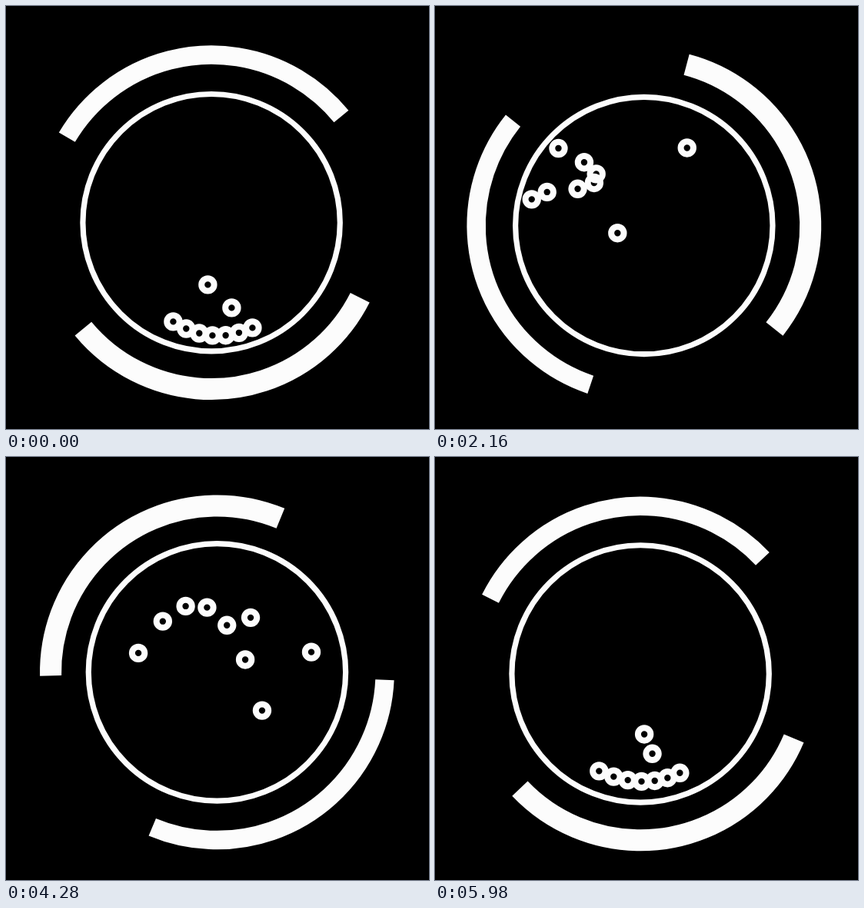
Write an HTML page with a canvas that moves like this. It is 550 by 550 pixels and loops after 6 s.

```html
<!DOCTYPE html>
<html lang="en">
<head>
<meta charset="utf-8">
<title>Tumbling drum</title>
<style>
  html, body { margin: 0; width: 100%; height: 100%; overflow: hidden; background: #000; }
  canvas { display: block; }
</style>
</head>
<body>
<canvas id="stage" width="550" height="550"></canvas>
<script>
const ctx = document.getElementById('stage').getContext('2d');
const RAD = Math.PI / 180;
const TICKS = 180;              // 60 ticks per second, one turn in 3 s
const SPIN = 360 / TICKS;       // degrees per tick
const MID = [271, 281.7];
const WALL = 150;               // farthest a ball gets from the drum centre
const COUNT = 9, LOOSE = 2;

// Two balls roam freely; the others spread along a bend through three points
const POSES = [
  { at: 0,   loose: [[262, 362], [293, 392]], bend: [[217, 410], [268, 428], [320, 418]] },
  { at: 44,  loose: [[353, 181], [206, 162]], bend: [[212, 204], [167, 218], [140, 249]], carried: true },
  { at: 94,  loose: [[385, 262], [354, 291]], bend: [[313, 377], [285, 233], [183, 277]] },
  { at: 109, loose: [[365, 246], [367, 372]], bend: [[203, 330], [270, 280], [188, 262]], tumble: true },
  { at: 164, loose: [[365, 326], [181, 307]], bend: [[177, 371], [260, 345], [283, 328]] }
];

const both = f => [f(0), f(1)];
const wrap = i => (i + POSES.length) % POSES.length;
const span = i => (POSES[wrap(i + 1)].at - POSES[wrap(i)].at + TICKS) % TICKS;

function place(i, ball) {
  const { loose, bend: [a, b, c] } = POSES[wrap(i)];
  if (ball < LOOSE) return loose[ball];
  const t = 2 * (ball - LOOSE) / (COUNT - LOOSE - 1) - 1;
  return both(n => b[n] + (c[n] - a[n]) / 2 * t + ((a[n] + c[n]) / 2 - b[n]) * t * t);
}

// Pixels per tick as a ball passes a pose
function velocity(i, ball) {
  const p = place(i, ball);
  if (POSES[wrap(i)].carried) {
    const w = SPIN * RAD;
    return [(MID[1] - p[1]) * w, (p[0] - MID[0]) * w];
  }
  const prev = place(i - 1, ball), next = place(i + 1, ball);
  const before = span(i - 1), after = span(i);
  return both(n =>
    ((p[n] - prev[n]) / before * after + (next[n] - p[n]) / after * before) / (before + after));
}

function ballAt(ball, tick, centre) {
  const i = POSES.filter(pose => pose.at <= tick).length - 1;
  const h = span(i), u = (tick - POSES[i].at) / h;
  const ease = u * u * (3 - 2 * u);
  const from = place(i, ball), to = place(i + 1, ball);
  const leave = velocity(i, ball), arrive = velocity(i + 1, ball);
  const p = both(n => from[n] + (to[n] - from[n]) * ease +
    h * u * (1 - u) * ((1 - u) * leave[n] - u * arrive[n]));
  if (POSES[i].tumble) {        // one more lift and fall
    const turn = 2 * Math.PI * ease;
    p[0] -= 55 * Math.sin(turn);
    p[1] -= 55 * (1 - Math.cos(turn));
  }
  const d = both(n => p[n] + 0.4 - centre[n]);
  const k = Math.min(1, WALL / Math.hypot(...d));
  return both(n => centre[n] + d[n] * k);
}

function arc([x, y], radius, width, from = 0, to = 360) {
  ctx.lineWidth = width;
  ctx.beginPath();
  ctx.arc(x, y, radius, from * RAD, to * RAD);
  ctx.stroke();
}

function draw(ms) {
  const tick = Math.floor(Math.floor(ms / 20) * 6 / 5) % TICKS;
  const turn = SPIN * tick;
  const centre = [
    MID[0] - 3.9 * Math.cos(turn * RAD),
    MID[1] - 3.9 * Math.sin(turn * RAD)
  ];
  ctx.fillStyle = '#000';
  ctx.fillRect(0, 0, 550, 550);
  ctx.strokeStyle = '#fcfcfc';
  arc(centre, 167.2, 7.2);
  arc(centre, 218.2, 24.4, 210.6 + turn, 320.7 + turn);
  arc(centre, 216.4, 28, 26.8 + turn, 140.4 + turn);
  for (let ball = 0; ball < COUNT; ball++) arc(ballAt(ball, tick, centre), 8.2, 8);
}

const start = performance.now();
function loop() {
  draw(performance.now() - start);
  requestAnimationFrame(loop);
}
loop();
</script>
</body>
</html>
```
